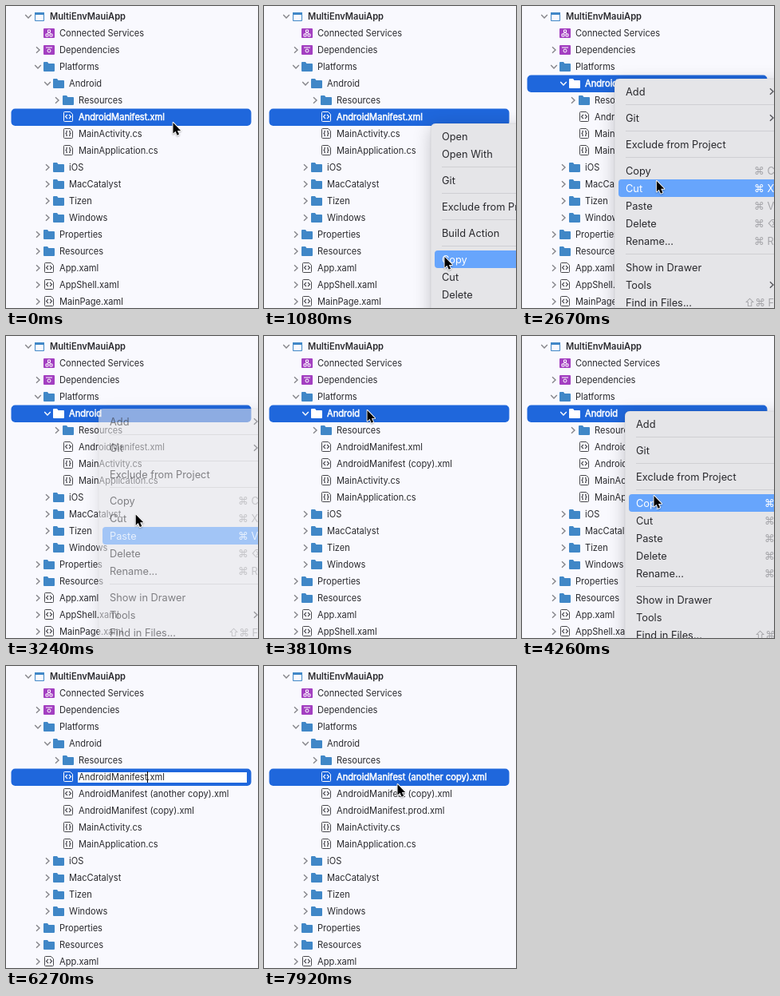
Recreate the animation shown at these times as an HTML page with a canvas. Size 316 by 378 pixels, loop 8000 ms.

```html
<!DOCTYPE html>
<html lang="en">
<head>
<meta charset="utf-8">
<title>Copying a manifest file</title>
<style>
html, body { margin: 0; width: 100%; height: 100%; overflow: hidden; background: #f9f9fe; }
canvas { display: block; }
</style>
</head>
<body>
<canvas id="stage" width="316" height="378"></canvas>
<script>
const ctx = document.getElementById("stage").getContext("2d");
const { width: W, height: H } = ctx.canvas;
const LOOP = 8000, FILE_ROW = 6, FOLDER_ROW = 4;
const FONT = 'Inter, "Noto Sans", "DejaVu Sans", sans-serif';
const PAPER = "#f9f9fe", INK = "#29292d", BLUE = "#1f67dc", FOLDER = "#4087c7", PURPLE = "#a33fc1", GLYPH = "#48484c";

// Moments of the story, in ms
const AT = { firstCopy: 3450, secondCopy: 5250, pickFile: 5580, edit: 5880, arrow: 6255,
  blink: 6720, type: 6870, enter: 7220, sort: 7260, pickCopy: 7800 };

// Each row: depth, chevron (v open, > closed, - none), icon, label
const HEAD = ["0vw MultiEnvMauiApp", "1-n Connected Services", "1>d Dependencies", "1vf Platforms", "2vf Android", "3>f Resources"];
const TAIL = ["3-c MainActivity.cs", "3-c MainApplication.cs", "2>f iOS", "2>f MacCatalyst", "2>f Tizen", "2>f Windows",
  "1>f Properties", "1>f Resources", "1>x App.xaml", "1>x AppShell.xaml", "1>x MainPage.xaml"];

const FILE_MENU = "Open,Open With>|Git>|Exclude from Project|Build Action>|Copy:⌘ C,Cut:⌘ X,Delete:⌘ ⌫,Rename...:⌘ R";
const FOLDER_MENU = "Add>|Git>|Exclude from Project|Copy:⌘ C,Cut:⌘ X,Paste:⌘ V,Delete:⌘ ⌫,Rename...:⌘ R|" +
  "Show in Drawer,Tools>,Find in Files...:⇧⌘ F";
const MENUS = [
  { x: 209, y: 146, spec: FILE_MENU, pick: "Copy", aimX: 226, open: 420, click: 1420 },
  { x: 116, y: 90, spec: FOLDER_MENU, pick: "Paste", aimX: 169, open: 2210, click: 3030 },
  { x: 129, y: 93, spec: FOLDER_MENU, pick: "Paste", aimX: 167, open: 3870, click: 4840 },
];

const clamp = v => Math.min(1, Math.max(0, v));
const smooth = u => u * u * (3 - 2 * u);
const easeOut = power => u => 1 - (1 - u) ** power;
const rowY = i => 13 + 21 * i;

function layout({ y, spec }) {
  let top = y + 17;
  return spec.split("|").flatMap((group, g) => {
    if (g) top += 11;
    return group.split(",").map((item, i) => {
      const [name, keys = ""] = item.split(":");
      top += 22;
      return { label: name.replace(">", ""), submenu: name.endsWith(">"), keys, y: top - 22, ruled: g > 0 && i === 0 };
    });
  });
}

// The pointer goes from each menu's corner to the picked item, then on to the next menu
const GLIDES = MENUS.flatMap((menu, i) => {
  menu.items = layout(menu);
  const { y } = menu.items.find(item => item.label === menu.pick);
  const next = MENUS[i + 1] || { x: 167, y: 148, open: 5435 };
  return [
    // sideways motion settles before the way down
    { from: menu.open + 200, to: menu.open + 820, x: menu.aimX, y, easeX: easeOut(8), easeY: easeOut(3) },
    { from: menu.click + 20, to: next.open - 90, x: next.x, y: next.y, easeX: smooth, easeY: smooth },
  ];
});

function pointer(t) {
  return GLIDES.reduce((p, g) => {
    const u = clamp((t - g.from) / (g.to - g.from));
    return { x: p.x + (g.x - p.x) * g.easeX(u), y: p.y + (g.y - p.y) * g.easeY(u) };
  }, MENUS[0]);
}

function text(str, x, y, color, size = 11.1, weight = 400) {
  ctx.font = `${weight} ${size}px ${FONT}`;
  ctx.fillStyle = color;
  ctx.fillText(str, x, y);
}

function fill(path, color) {
  ctx.fillStyle = color;
  ctx.fill(path);
}

function stroke(path, color, width = 1) {
  ctx.strokeStyle = color;
  ctx.lineWidth = width;
  ctx.stroke(path);
}

function rounded(x, y, w, h, r) {
  const path = new Path2D();
  path.roundRect(x, y, w, h, r);
  return path;
}

function at(x, y, paint) {
  ctx.save();
  ctx.translate(x, y);
  paint();
  ctx.restore();
}

const SHAPE = {
  folder: "M-7-5q0-1 1-1h4l1.5 2h6.5q1 0 1 1v8q0 1-1 1h-12q-1 0-1-1z",
  page: "M-5.5-5.5q0-1 1-1h7l3 3v8q0 1-1 1h-9q-1 0-1-1z",
  angles: "M-1-3l-2.5 2.5 2.5 2.5M1-3l2.5 2.5-2.5 2.5",
  braces: "M-1-3.5h-1v2l-1 1 1 1v2h1M1-3.5h1v2l1 1-1 1v2h-1",
  frame: "M-5.5-4.5h11v10h-11z",
  bar: "M-6-5h12v3h-12z",
  tile: "M-6-6h12q1 0 1 1v10q0 1-1 1h-12q-1 0-1-1v-10q0-1 1-1z",
  network: "M-4 1h3v3h-3zM1 1h3v3h-3zM-1.5-4h3v3h-3zM0-1l-2.5 2M0-1l2.5 2",
  parcel: "M-4-3h8M-2 1a2 2 0 1 0 4 0a2 2 0 1 0-4 0",
  right: "M-2-3.8l4 3.8-4 3.8",
  down: "M-3.8-2l3.8 4 3.8-4",
  arrow: "M.5 0v13.5l3-2.8 2.2 5 2.4-1.1-2.2-4.7h4.2z",
};
for (const name in SHAPE) SHAPE[name] = new Path2D(SHAPE[name]);

function document_(mark, on) {
  const color = on ? "#fff" : GLYPH;
  stroke(SHAPE.page, color);
  stroke(mark, color, 1.1);
}

function tile(mark) {
  fill(SHAPE.tile, PURPLE);
  stroke(mark, "#fff");
}

const ICONS = {
  w() { stroke(SHAPE.frame, FOLDER); fill(SHAPE.bar, FOLDER); },
  n: () => tile(SHAPE.network),
  d: () => tile(SHAPE.parcel),
  f: on => fill(SHAPE.folder, on ? "#fff" : FOLDER),
  x: on => document_(SHAPE.angles, on),
  c: on => document_(SHAPE.braces, on),
};

function manifests(t) {
  const names = [""];
  if (t >= AT.secondCopy) names.push(" (another copy)");
  if (t >= AT.firstCopy) names.push(" (copy)");
  if (t >= AT.enter) names[0] = ".prod";
  if (t >= AT.sort) names.push(names.shift());
  return names.map(n => `3-x AndroidManifest${n}.xml`);
}

function selectedRow(t) {
  if (t >= AT.sort && t < AT.pickCopy) return -1;
  return t >= MENUS[1].open + 30 && t < AT.pickFile ? FOLDER_ROW : FILE_ROW;
}

function drawEditor(t) {
  const y = rowY(FILE_ROW), stem = "AndroidManifest";
  const grow = 10 * (1 - smooth(clamp((t - AT.edit) / 300)));
  const typed = ".prod".slice(0, Math.max(0, Math.floor((t - AT.type) / 65) + 1));
  if (grow > 0)
    stroke(rounded(89 - grow, y - 7 - grow, 214 + 2 * grow, 15 + 2 * grow, 3), `rgba(80,145,240,${0.6 - grow * 0.05})`, 3);
  fill(rounded(90, y - 6, 212, 13, 0), "#fff");
  ctx.font = `400 11.1px ${FONT}`;
  const caret = 91 + ctx.measureText(stem + typed).width;
  if (t < AT.arrow) fill(rounded(91, y - 6, caret - 91, 13, 0), "#b3d7fe");
  text(stem + typed + ".xml", 91, y + 4, INK);
  if (t >= AT.arrow && (t < AT.blink || t >= AT.type)) fill(rounded(Math.round(caret), y - 7, 1, 14, 0), "#000");
}

function drawTree(t) {
  const selected = selectedRow(t), editing = t >= AT.edit && t < AT.enter;
  [...HEAD, ...manifests(t), ...TAIL].forEach((row, i) => {
    const [depth, fold, icon] = row, label = row.slice(4);
    const x = 55 + 12 * depth, y = rowY(i), on = i === selected;
    if (on) fill(rounded(6.5, y - 10.5, 301, 21.5, 5), BLUE);
    if (fold !== "-")
      at(x - 27, y, () => stroke(fold === "v" ? SHAPE.down : SHAPE.right, on ? "#fff" : "#85858a", 1.4));
    at(x - 13, y, () => ICONS[icon](on));
    if (on && editing) return;
    text(label, x, y + 4, on ? "#fff" : INK, 11.1, i ? 400 : 600);
    if (on) {
      ctx.strokeStyle = "#fff";
      ctx.lineWidth = 0.5;
      ctx.strokeText(label, x, y + 4);
    }
  });
  if (editing) drawEditor(t);
}

function drawMenu(menu, t, mouse) {
  const { x, y } = menu;
  const alpha = Math.min(clamp((t - menu.open) / 30), 1 - clamp((t - menu.click - 100) / 250));
  if (alpha <= 0) return;
  const panel = rounded(x, y + 1, 230, 320, 6);
  const outside = new Path2D(panel);
  outside.rect(0, 0, W, H);
  ctx.save();
  ctx.globalAlpha = alpha;
  ctx.save();
  ctx.clip(outside, "evenodd");
  ctx.shadowColor = "rgba(0,0,0,.22)";
  ctx.shadowBlur = 22;
  ctx.shadowOffsetY = 5;
  fill(panel, "#e5e5e8");
  ctx.restore();
  fill(panel, "#e5e5e8");
  stroke(panel, "rgba(0,0,0,.08)", 0.8);
  for (const item of menu.items) {
    const on = t >= menu.click ? item.label === menu.pick : Math.abs(mouse.y - item.y) < 11;
    const keyInk = on ? "#fff" : "#a5a5a9";
    ctx.globalAlpha = alpha;
    if (item.ruled) fill(rounded(x + 14, item.y - 17, 202, 1, 0), "#cfcfd3");
    if (on) fill(rounded(x + 5, item.y - 11, 220, 22, 4), "#67a5fc");
    if (on) ctx.globalAlpha = Math.sqrt(alpha);
    text(item.label, x + 14, item.y + 4.5, on ? "#fff" : INK, 12.8);
    text(item.keys, x + (item.keys[0] === "⇧" ? 163 : 175), item.y + 4.5, keyInk, 12.8);
    if (item.submenu) at(x + 197, item.y, () => stroke(SHAPE.right, on ? "#fff" : "#55555a", 1.4));
  }
  ctx.restore();
}

function drawPointer({ x, y }) {
  at(x, y, () => {
    ctx.lineJoin = "round";
    ctx.shadowColor = "rgba(0,0,0,.3)";
    ctx.shadowBlur = 2;
    ctx.shadowOffsetY = 1;
    stroke(SHAPE.arrow, "#fff", 1.8);
    ctx.shadowColor = "transparent";
    fill(SHAPE.arrow, "#000");
  });
}

function draw() {
  const t = performance.now() % LOOP, mouse = pointer(t);
  ctx.fillStyle = PAPER;
  ctx.fillRect(0, 0, W, H);
  drawTree(t);
  MENUS.forEach(menu => drawMenu(menu, t, mouse));
  if (t < AT.edit || t >= AT.pickCopy - 180) drawPointer(mouse);
  requestAnimationFrame(draw);
}
draw();
</script>
</body>
</html>
```
